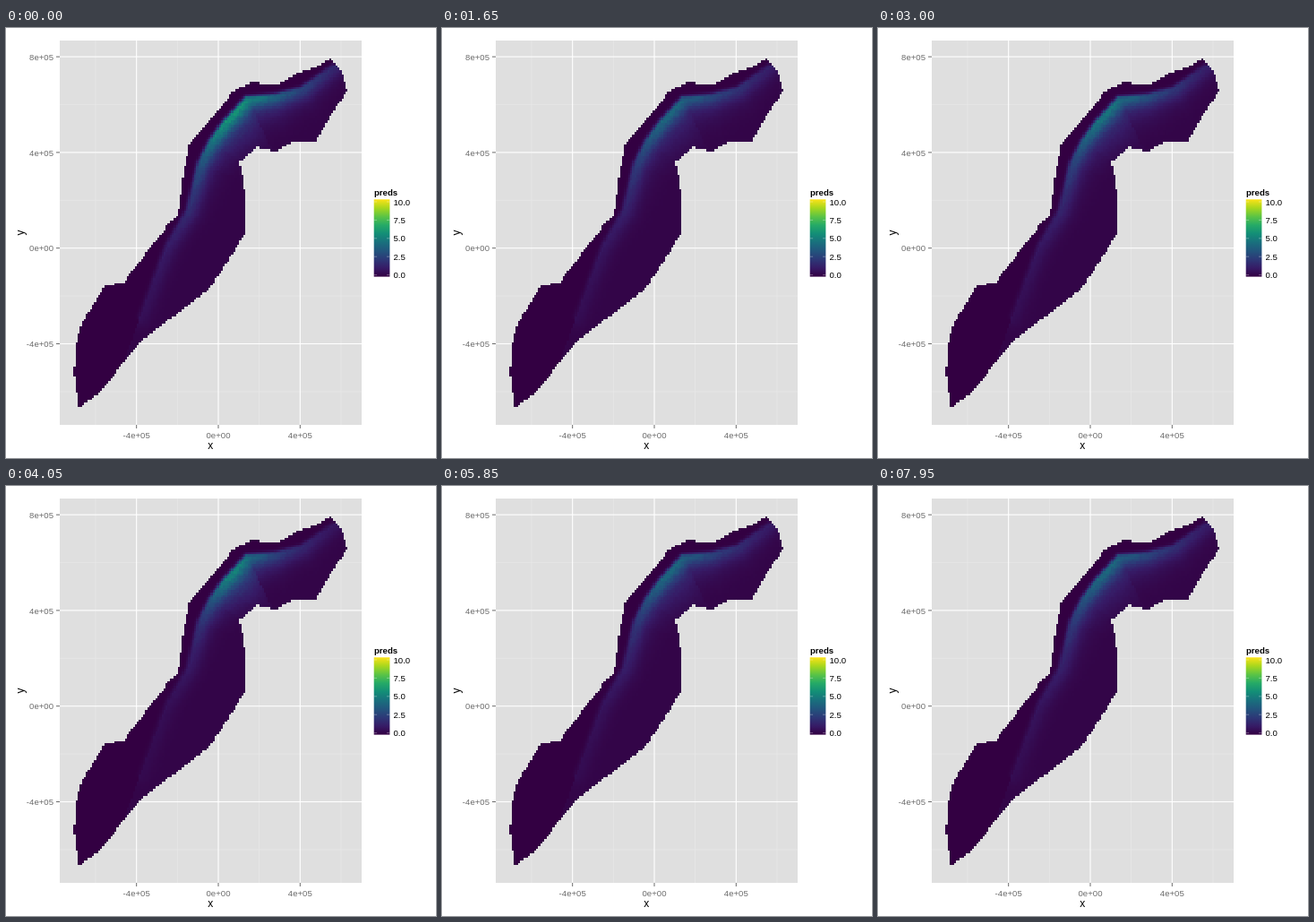
Write an HTML page with a canvas that moves like this. It is 480 px wide and 480 px high and loops after 8000 ms.

```html
<!DOCTYPE html>
<html lang="en">
<head>
<meta charset="utf-8">
<title>Predictions map</title>
<style>
  html, body { margin: 0; width: 100%; height: 100%; overflow: hidden; background: #fff; }
  canvas { display: block; width: 480px; height: 480px; }
</style>
</head>
<body>
<canvas id="stage" width="480" height="480"></canvas>
<script>
const ctx = document.getElementById('stage').getContext('2d');
const LOOP = 8000, STEP = 150;

// Map raster: 134 x 146 cells
const LEFT = 75.4, TOP = 33.6, CELL_W = 2.284, CELL_H = 2.67, COLS = 134, ROWS = 146;

const coast = new Path2D(`M363 34 370 42 376 52 381 70 359 103 346 126 320 127 300 138
  280 133 261 150 266 174 267 229 240 272 227 291 149 351 104 408 81 424 78 400 76 385
  78 355 83 332 110 288 131 284 183 217 192 209 198 165 205 128 222 108 236 93 253 71
  277 59 283 62 305 63 325 50 343 45Z`);

// Crest of the high values, south-west to north-east
const ridge = [[150, 322], [179, 244], [203, 204], [216, 152], [228, 128], [243, 107],
  [269, 79], [300, 76], [330, 68], [365, 43]];

// [time, highest value, reach along the crest]
const keys = [[0, 5.6, .2], [1050, 3.7, .16], [2100, 4, .25], [4050, 5, .14],
  [5850, 3.9, .19], [6900, 4.9, .17], [7950, 3.9, .2]];

const mix = (a, b, k) => a + (b - a) * k;

// Viridis, darkened by a display gamma
const palette = ['440154', '482878', '3e4a89', '31688e', '26828e', '1f9e89', '35b779', '6ece58', 'b5de2b', 'fde725']
  .map(hex => [0, 2, 4].map(i => 255 * (parseInt(hex.slice(i, i + 2), 16) / 255) ** 1.222));

function colour(value) {
  const p = Math.max(0, Math.min(8.999, value / 10.2 * 9)), i = Math.floor(p);
  return `rgb(${palette[i].map((c, n) => Math.round(mix(c, palette[i + 1][n], p - i)))})`;
}

// Signed distance d from the crest (positive inland) and share u of its length
function locate(x, y) {
  let best = { d: Infinity }, length = 0;
  for (let i = 0; i < ridge.length - 1; i++) {
    const [ax, ay] = ridge[i], dx = ridge[i + 1][0] - ax, dy = ridge[i + 1][1] - ay;
    const part = Math.hypot(dx, dy);
    const k = Math.max(0, Math.min(1, ((x - ax) * dx + (y - ay) * dy) / part ** 2));
    const d = Math.hypot(x - ax - k * dx, y - ay - k * dy);
    if (d < Math.abs(best.d)) {
      const side = dx * (y - ay) < dy * (x - ax) ? -1 : 1;
      best = { d: d * side, u: length + k * part };
    }
    length += part;
  }
  return { d: best.d, u: best.u / length };
}

let seed = 7;
const random = () => (seed = seed * 16807 % 2147483647) / 2147483647;

const cells = [];
for (let r = 0; r < ROWS; r++) for (let c = 0; c < COLS; c++) {
  const x = LEFT + (c + .5) * CELL_W, y = TOP + (r + .5) * CELL_H;
  if (!ctx.isPointInPath(coast, x, y)) continue;
  const x0 = Math.round(x - CELL_W / 2), y0 = Math.round(y - CELL_H / 2);
  cells.push({
    ...locate(x, y), x0, y0,
    w: Math.round(x + CELL_W / 2) - x0, h: Math.round(y + CELL_H / 2) - y0,
    grain: .94 + .12 * random()
  });
}

const bell = x => Math.exp(-x * x);

// Steep on the seaward side; inland a bright core with a tail, wider where values are high
function valueOf({ d, u, grain }, peak, reach) {
  const level = 1 / (1 + ((u - .66) / reach) ** 2);
  if (d < 0) return peak * level * bell(d / 3.2) * grain;
  const share = .75 - 1.8 * reach;
  const shape = mix(bell(d / 11), bell(d / (10 + 24 * level)), share);
  return (peak * level * shape + .2) * grain;
}

function drawMap(t) {
  const n = Math.max(1, keys.findIndex(key => key[0] >= t));
  const a = keys[n - 1], b = keys[n], k = (t - a[0]) / (b[0] - a[0]);
  const peak = mix(a[1], b[1], k), reach = mix(a[2], b[2], k);
  for (const cell of cells) rect(colour(valueOf(cell, peak, reach)), cell.x0, cell.y0, cell.w, cell.h);
}

function rect(fill, x, y, w, h) {
  ctx.fillStyle = fill;
  ctx.fillRect(x, y, w, h);
}

function text(str, x, y, { size = 9.6, fill = '#000', align = 'left', weight = '' } = {}) {
  ctx.font = `${weight} ${size}px "Liberation Sans", Arial, sans-serif`;
  ctx.fillStyle = fill;
  ctx.textAlign = align;
  ctx.fillText(str, x, y);
}

const xAt = v => 237 + v * 22.83, yAt = v => 245.7 - v * 26.7;
const label = v => v ? v + 'e+05' : '0e+00';

function drawAxes() {
  const grey = '#6d6d6d';
  rect('#dfdfdf', 60, 14, 337, 429);
  for (let v = -6; v <= 6; v += 4) {
    rect('#e7e7e7', xAt(v) - .4, 14, .8, 429);
    rect('#e7e7e7', 60, yAt(v) - .4, 337, .8);
  }
  for (let v = -4; v <= 4; v += 4) {
    rect('#fff', xAt(v) - .55, 14, 1.1, 429);
    rect(grey, xAt(v) - .5, 443, 1, 4);
    text(label(v), xAt(v), 458, { fill: grey, align: 'center' });
  }
  for (let v = -4; v <= 8; v += 4) {
    rect('#fff', 60, yAt(v) - .55, 337, 1.1);
    rect(grey, 56, yAt(v) - .5, 4, 1);
    text(label(v), 53, yAt(v) + 3.6, { fill: grey, align: 'right' });
  }
  text('x', 228.3, 470, { size: 12, align: 'center' });
  ctx.save();
  ctx.translate(19.5, 228.5);
  ctx.rotate(-Math.PI / 2);
  text('y', 0, 0, { size: 12, align: 'center' });
  ctx.restore();
}

function drawLegend() {
  const x = 410.7, top = 191.3, w = 17.7, h = 86.3;
  const ramp = ctx.createLinearGradient(0, top + h, 0, top);
  for (let i = 0; i <= 9; i++) ramp.addColorStop(i / 9, colour(i / 9 * 10.2));
  text('preds', 411, 187, { weight: 'bold' });
  rect(ramp, x, top, w, h);
  for (let v = 0; v <= 10; v += 2.5) {
    const y = 275.6 - v * 8.16;
    for (const tick of [x, x + w - 3.4]) rect('rgba(255,255,255,.3)', tick, y - .5, 3.4, 1);
    text(v.toFixed(1), 432.5, y + 3.5);
  }
}

const start = performance.now();
let shown = -1;

function frame() {
  const step = Math.floor((performance.now() - start) % LOOP / STEP);
  if (step !== shown) drawMap((shown = step) * STEP);
  requestAnimationFrame(frame);
}

rect('#fff', 0, 0, 480, 480);
drawAxes();
drawLegend();
frame();
</script>
</body>
</html>
```
